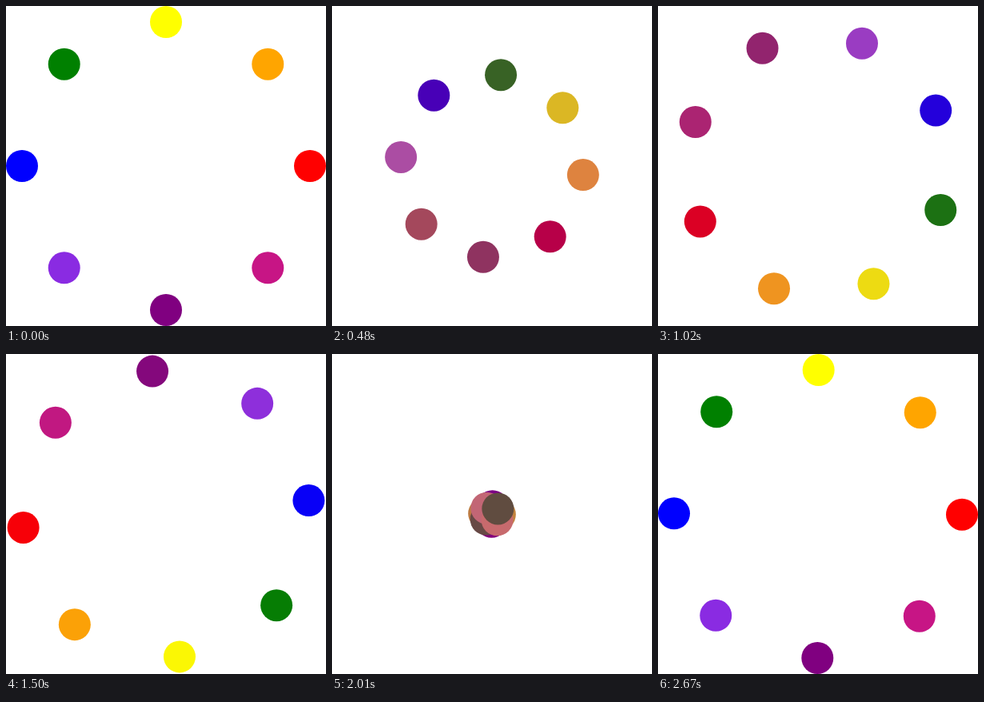
An HTML page that plays this animation: 400x400 px, repeating every 2700 ms.

```html
<!DOCTYPE html>
<html lang="en">
<head>
<meta charset="utf-8">
<title>Dot ring</title>
<style>
  html, body { margin: 0; width: 100%; height: 100%; overflow: hidden; background: #fff; }
  svg { display: block; width: 100%; height: 100%; }
</style>
</head>
<body>
<svg id="stage" viewBox="-200 -200 400 400"></svg>
<script>
  const LOOP = 2700, STEP = 30, REACH = 180, SIZE = 20;

  // Clockwise from the right, one every 45 degrees
  const colors = [
    [255, 0, 0], [199, 21, 133], [128, 0, 128], [138, 43, 226],
    [0, 0, 255], [0, 128, 0], [255, 255, 0], [255, 165, 0]
  ];
  // Stacking, bottom to top: straight directions first, then diagonals
  const order = [6, 0, 4, 2, 5, 7, 3, 1];

  const stage = document.getElementById('stage');
  const dots = order.map(slot => {
    const el = document.createElementNS('http://www.w3.org/2000/svg', 'circle');
    el.setAttribute('r', SIZE);
    stage.append(el);
    return { el, slot, from: colors[slot], to: colors[(slot + 4) % 8] };
  });

  const mix = (a, b, k) => `rgb(${a.map((v, i) => Math.round(v + (b[i] - v) * k))})`;

  function draw(ms) {
    const t = Math.floor((ms % LOOP) / STEP) * STEP;
    const swing = (1 - Math.cos(2 * Math.PI * t / LOOP)) / 2;
    const turn = Math.PI * swing;
    const radius = REACH * Math.cos(turn); // negative past the centre

    for (const { el, slot, from, to } of dots) {
      const angle = turn + slot * Math.PI / 4;
      el.setAttribute('cx', radius * Math.cos(angle));
      el.setAttribute('cy', radius * Math.sin(angle));
      el.setAttribute('fill', mix(from, to, swing));
    }
  }

  const start = performance.now();
  function tick() {
    draw(performance.now() - start);
    requestAnimationFrame(tick);
  }
  tick();
</script>
</body>
</html>
```
